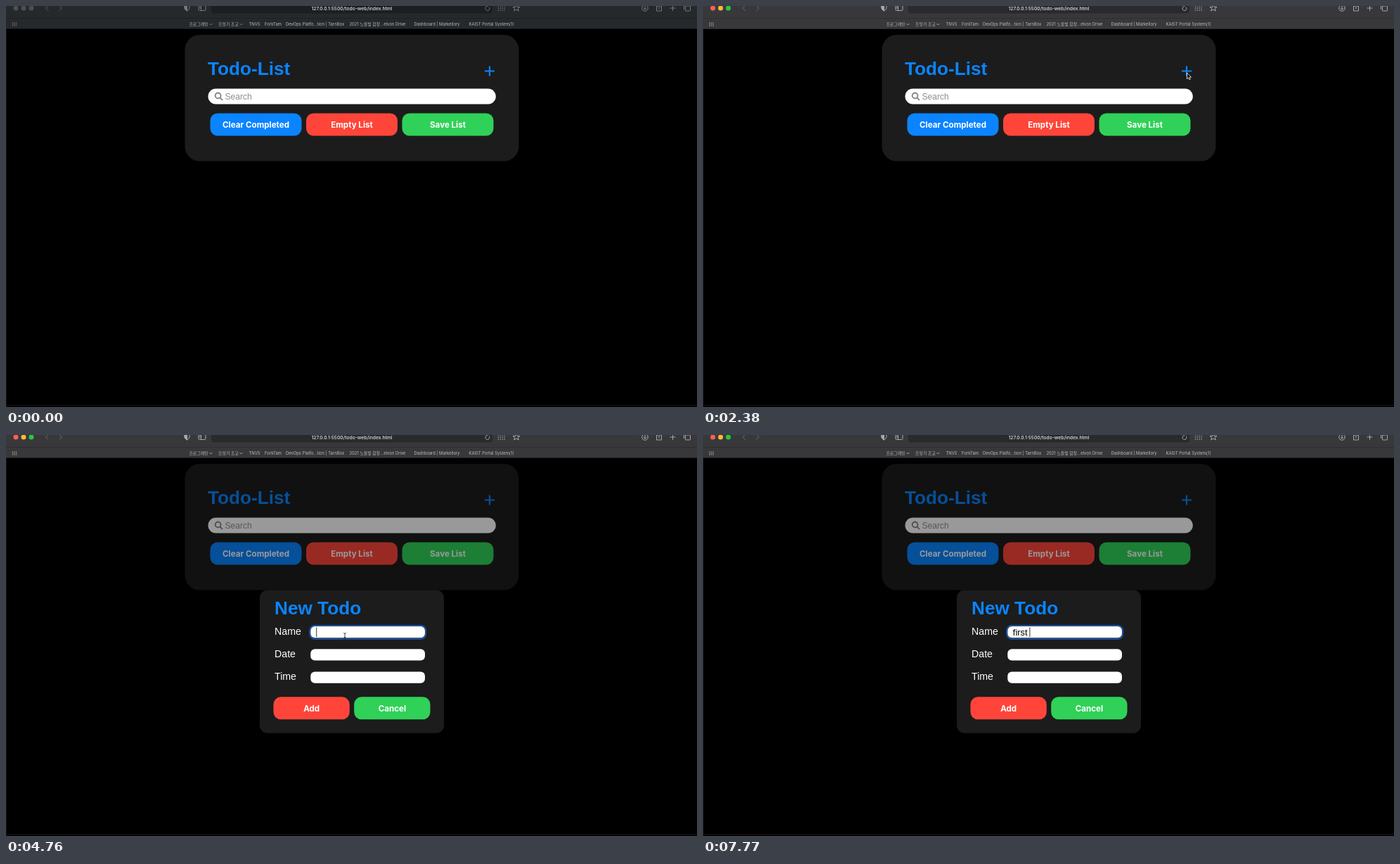
An HTML page for the animation above (8 s loop, 983 by 570 pixels).

```html
<!DOCTYPE html>
<html lang="ko">
<head>
<meta charset="utf-8">
<title>Todo-List</title>
<style>
  html, body { margin: 0; width: 100%; height: 100%; overflow: hidden; background: #000; }
  svg { display: block; width: 983px; height: 570px; }
  text { white-space: pre; }
  .ui { font-family: Inter, "Noto Sans CJK KR", "Noto Sans CJK", sans-serif; }
  .page { font-family: "Liberation Sans", Arial, sans-serif; }
  .mid text { text-anchor: middle; }
  .title { font-size: 26.2px; font-weight: 700; fill: #0a84ff; }
  .label { font-size: 14.2px; fill: #fff; }
  .btn { font: 700 11.6px Inter, sans-serif; fill: #fff; text-anchor: middle; }
  .line { fill: none; stroke: #c8c8ca; stroke-width: 1; stroke-linecap: round; stroke-linejoin: round; }
</style>
</head>
<body>
<svg viewBox="0 0 983 570">
  <rect width="983" height="570"/>

  <g id="toolbar" class="ui">
    <rect width="983" height="32.5" fill="#25292b"/>
    <rect y="17" width="983" height="1" fill="#1d2022"/>
    <rect x="292" y="-10" width="400" height="20.5" rx="4" fill="#1b1f21"/>
    <g fill="#4c5052"><circle cx="14" cy="3" r="3.5"/><circle cx="25" cy="3" r="3.5"/><circle cx="36" cy="3" r="3.5"/></g>
    <g id="active">
      <rect width="983" height="32.5" fill="#38383b"/>
      <rect y="17" width="983" height="1" fill="#2e2e31"/>
      <rect x="292" y="-10" width="400" height="20.5" rx="4" fill="#2a2a2d"/>
      <circle cx="14" cy="3" r="3.5" fill="#ff5f57"/>
      <circle cx="25" cy="3" r="3.5" fill="#febc2e"/>
      <circle cx="36" cy="3" r="3.5" fill="#28c840"/>
    </g>
    <path class="line" opacity=".35" d="M60 -.5L56.5 3L60 6.5M76 -.5L79.500 3L76 6.500"/>
    <g id="icons" class="line">
      <path d="M257.500 -2L261 -.5V3Q260.500 5.500 257.500 7Q254.500 5.500 254 3V-.5Z"/>
      <path d="M257.500 -2V7Q254.500 5.500 254 3V-.5Z" fill="#c8c8ca"/>
      <rect x="274" y="-2" width="10" height="8.500" rx="1.500"/>
      <path d="M277.500 -2V6.500M275.300 1H276.300M275.300 3H276.300"/>
      <path d="M687.600 2A3 3 0 1 1 685 .5L684 -1"/>
      <path d="M700.500 0H710M700.500 3H710M700.500 6H710" stroke-width="1.600" stroke-dasharray="0 2.900"/>
      <path d="M726 -2L727.500 1.500H731L728.200 3.700L729.300 7L726 5L722.700 7L723.800 3.700L721 1.500H724.500Z"/>
      <circle cx="909" cy="3" r="4.300"/>
      <path d="M909 0V5M907.200 3.500L909 5.200L910.800 3.500"/>
      <path d="M927 .5H925.500V7H932.500V.5H931M929 -2V4"/>
      <path d="M945 3H952M948.500 -.5V6.500"/>
      <path d="M964.500 4.500V-2H971"/>
      <rect x="966.500" y="0" width="7" height="7" rx="1"/>
      <path d="M9.500 24H16M9.500 26H16M9.500 28H16" stroke-width="1.400" stroke-dasharray="0 2.500"/>
      <path d="M289.800 25.300L291.500 27L293.200 25.300M332.800 25.300L334.500 27L336.200 25.300"/>
    </g>
    <g class="mid">
      <text x="492" y="5.500" font-size="6.750" font-weight="500" fill="#e4e5e6">127.0.0.1:5500/todo-web/index.html</text>
      <g id="marks" font-size="5.900" fill="#b9bbbd"></g>
    </g>
  </g>

  <g class="page">
    <rect x="254.500" y="41" width="475" height="179.500" rx="21" fill="#1c1c1d"/>
    <text class="title" x="287" y="98">Todo-List</text>
    <path d="M681 92.500H695M688 85.500V99.500" stroke="#0a84ff" stroke-width="2.200"/>
    <rect x="287.500" y="117.500" width="409.300" height="22" rx="11" fill="#fff"/>
    <g fill="none" stroke="#858585" stroke-width="1.900">
      <circle cx="301.600" cy="127.400" r="3.900"/><path d="M304.500 130.300L308 133.800"/>
    </g>
    <text x="311.500" y="132.500" font-size="12.100" fill="#8e8e8e">Search</text>
    <g id="actions"></g>
  </g>

  <g id="modal" class="page">
    <rect y="32.500" width="983" height="537.500" opacity=".4"/>
    <rect x="361" y="220.500" width="262" height="203.300" rx="11" fill="#1c1c1d"/>
    <rect id="selection" x="382.500" y="231" width="54.500" height="30.500" fill="#5685b4"/>
    <text class="title" x="382" y="255">New Todo</text>
    <g id="fields"></g>
    <g id="focus">
      <rect x="432.200" y="270.800" width="165" height="19" rx="7" fill="none" stroke="#1757b0" stroke-width="1.800"/>
      <text id="typed" x="440.800" y="284.700" font-size="12.900"></text>
      <rect id="caret" y="273.500" width="1" height="13.500" fill="#333"/>
    </g>
    <g id="dialogActions"></g>
  </g>

  <path d="M.5 33V570M0 567.500H983" stroke="#161616" fill="none"/>

  <g id="pointer">
    <circle id="ring" cx=".5" cy=".5" r="11.800" fill="#777" fill-opacity=".12" stroke="#77797b" stroke-width="1.800"/>
    <path id="arrow" d="M0 0V8.500L2 6.800L3.300 9.700L4.800 9L3.500 6.200H6Z" fill="#000" stroke="#fff" stroke-width=".8" stroke-linejoin="round"/>
    <path id="beam" d="M-1.800 -4.500Q0 -4.500 0 -3.200Q0 -4.500 1.800 -4.500M0 -3.500V3.500M-1.800 4.500Q0 4.500 0 3.200Q0 4.500 1.800 4.500M-1.200 1.500H1.200" fill="none" stroke="#333" stroke-width=".9"/>
  </g>
</svg>

<script>
const $ = id => document.getElementById(id);
const show = (id, on) => { $(id).style.display = on ? '' : 'none'; };

const BLUE = '#0a84ff', RED = '#ff453a', GREEN = '#30d158';
const button = (x, y, w, fill, label) =>
  `<rect x="${x}" y="${y}" width="${w}" height="32" rx="10.5" fill="${fill}"/>
   <text class="btn" x="${x + w / 2}" y="${y + 20.4}">${label}</text>`;

$('actions').innerHTML =
  button(290.5, 152.5, 130, BLUE, 'Clear Completed') +
  button(427, 152.5, 130, RED, 'Empty List') +
  button(563.5, 152.5, 130, GREEN, 'Save List');
$('dialogActions').innerHTML =
  button(380.5, 372.3, 108.3, RED, 'Add') +
  button(495.2, 372.3, 108.3, GREEN, 'Cancel');
$('fields').innerHTML = ['Name', 'Date', 'Time'].map((label, i) => {
  const y = 272 + i * 32.2;
  return `<text class="label" x="382" y="${y + 11.5}">${label}</text>
    <rect x="433.3" y="${y}" width="162.7" height="16.3" rx="6" fill="#fff"/>`;
}).join('');
$('marks').innerHTML = [
  [274, '프로그래밍'], [316.5, '프밍기 조교'], [353.5, 'TNVS'], [380, 'ForkTam'],
  [439.5, 'DevOps Platfo…tion | TarnBox'], [528.5, '2021 노을빛 합창…elvon Drive'],
  [613, 'Dashboard | Markellory'], [690.5, 'KAIST Portal System(1)']
].map(([x, label]) => `<text x="${x}" y="28">${label}</text>`).join('');

const LOOP = 8000, TICK = 70;
const OPEN = 2660, CLICK = 3650;

// pointer path: time, x, y
const path = [
  [0, 540, 590], [350, 636, 262], [420, 636, 262], [910, 685, 110], [1190, 685, 110],
  [1400, 686, 99], [1470, 686, 99], [1750, 688.5, 95], [2940, 688.5, 95], [3640, 482, 286]
];
// keystrokes: time, character, caret position afterwards
const keys = [
  [5040, 'f', 444.3], [5180, 'i', 447.2], [5460, 'r', 451.4],
  [5810, 's', 457.9], [6090, 't', 461.5], [7770, ' ', 464.4]
];

const clamp = v => Math.min(1, Math.max(0, v));
const ramp = (t, a, b) => clamp((t - a) / (b - a));
const ease = k => k * k * (3 - 2 * k);

function pointerAt(t) {
  const i = path.findIndex(p => p[0] > t);
  if (i < 0) return path[path.length - 1].slice(1);
  const [a, x0, y0] = path[i - 1], [b, x1, y1] = path[i];
  const k = ease(ramp(t, a, b));
  return [x0 + (x1 - x0) * k, y0 + (y1 - y0) * k];
}

function ringAt(t) {
  if (t >= OPEN && t < 3010) return t < 2800 ? 1 : t < 2870 ? .6 : .3;
  return t >= 3640 && t < 3780 ? 1 : 0;
}

function draw(now) {
  const t = Math.floor(now % LOOP / TICK) * TICK;

  const active = ramp(t, 1820, 2100);
  $('active').style.opacity = active;
  $('icons').style.opacity = .5 + .28 * active;

  show('modal', t >= OPEN);
  show('selection', t < CLICK);
  show('focus', t >= CLICK);

  const done = keys.filter(k => k[0] <= t);
  const [last, , caretX] = done[done.length - 1] || [CLICK, '', 441.2];
  $('typed').textContent = done.map(k => k[1]).join('');
  $('caret').setAttribute('x', caretX);
  show('caret', Math.floor((t - last) / 525) % 2 === 0);

  const [x, y] = pointerAt(t);
  const overField = t >= OPEN && y > 270;
  $('pointer').setAttribute('transform', `translate(${x} ${y})`);
  show('pointer', t >= TICK && t < keys[0][0]);
  show('arrow', !overField);
  show('beam', overField);
  $('ring').style.opacity = ringAt(t);
}

function loop() {
  draw(performance.now());
  requestAnimationFrame(loop);
}
loop();
</script>
</body>
</html>
```
